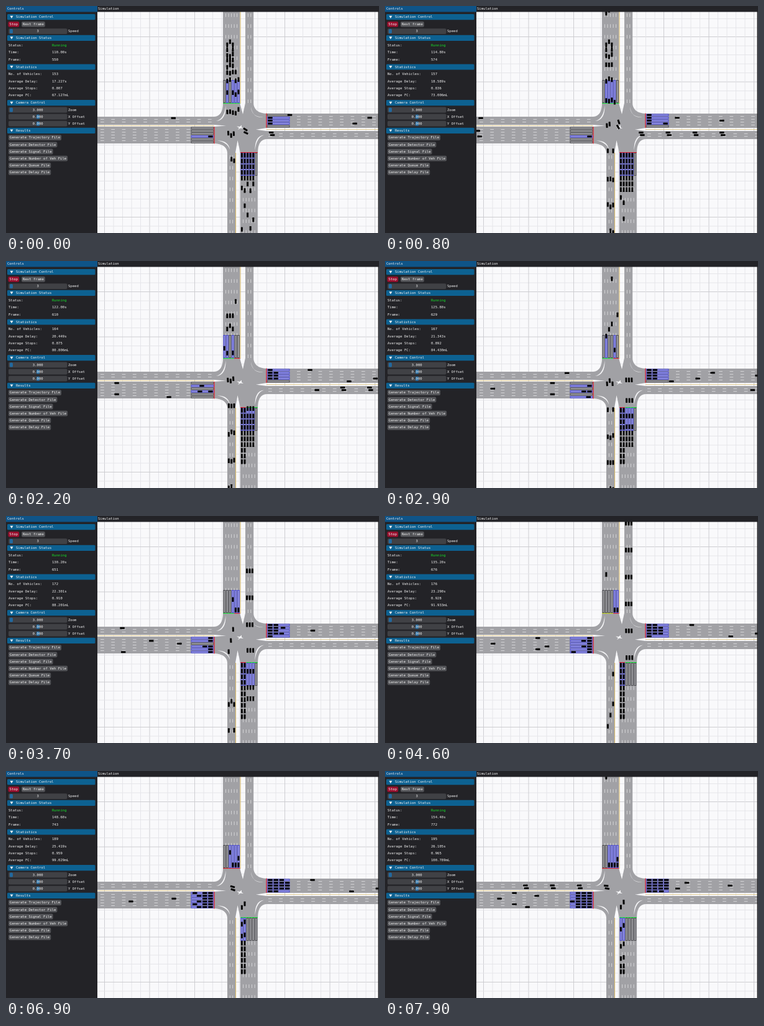
An HTML page with a canvas for the animation above (8 s loop, 600 px wide and 365 px high).

```html
<!DOCTYPE html>
<html lang="en">
<head>
<meta charset="utf-8">
<title>Traffic simulation</title>
<style>
html, body { margin: 0; width: 100%; height: 100%; overflow: hidden; background: #232327; }
canvas { display: block; }
</style>
</head>
<body>
<canvas id="stage" width="600" height="365"></canvas>
<script>
const ctx = document.getElementById('stage').getContext('2d');
const LOOP = 8000, STEP = 100, SPEED = 24, GAP = 9.2;
const FIRST = 550, LAST = 772;

// The simulation does not advance quite evenly: [ms, frame].
const pace = [[0, FIRST], [800, 574], [2200, 610], [4600, 676], [7900, LAST]];
function frameAt(ms) {
  const i = Math.max(1, pace.findIndex(([t]) => t >= ms));
  const [t0, f0] = pace[i - 1], [t1, f1] = pace[i];
  return Math.round(f0 + (f1 - f0) * (ms - t0) / (t1 - t0));
}
// A statistic that climbs from a to b, faster at first when bend > 0.
function climb(frame, a, b, bend) {
  const p = (frame - FIRST) / (LAST - FIRST);
  return a + (b - a) * (p + bend * p * (1 - p));
}

let seed = 7;
function random() {
  seed = seed * 16807 % 2147483647;
  return seed / 2147483647;
}

// Lane centres of the approaches and of the exits.
const lanes = (first, step, n) => Array.from({ length: n }, (_, i) => first + step * i);
const north = lanes(351.3, 4.53, 6), south = lanes(379.4, 4.6, 6);
const west = lanes(196.3, 4.5, 6), east = lanes(175.3, 4.53, 5);
const southOut = lanes(358.4, 4.3, 3), northOut = lanes(387.6, 4.4, 3);

// ---- vehicles ----
const cars = [];
function route(d) {
  const path = document.createElementNS('http://www.w3.org/2000/svg', 'path');
  path.setAttribute('d', d);
  return path;
}
// Distance covered after u seconds when accelerating from rest up to full speed.
function run(u, accel) {
  if (u <= 0) return 0;
  return u < SPEED / accel ? accel * u * u / 2 : SPEED * u - SPEED * SPEED / accel / 2;
}
function add(path, stop, arrive, depart = 1e4) {
  cars.push({ path, stop, arrive, depart, brake: 7, accel: 3.9 });
}
function cruise(path, pos, time) {
  cars.push({ path, stop: pos, arrive: time, depart: time, brake: 1e9, accel: 1e9 });
}
function place(car, T) {
  const s = car.stop - run(car.arrive - T, car.brake) + run(T - car.depart, car.accel);
  const p = car.path.getPointAtLength(s);
  const q = car.path.getPointAtLength(s + 1), r = car.path.getPointAtLength(s - 1);
  return { x: p.x, y: p.y, angle: Math.atan2(q.y - r.y, q.x - r.x) };
}

// From the north: right turn, three straight lanes, two left-turn lanes.
const northRight = route(`M${north[0]} -400V160Q${north[0]} 180.2 333 180.2H-900`);
cruise(northRight, 655, 110);
cruise(northRight, 742, 130.4);
const northAhead = southOut.map((x, i) =>
  route(`M${north[i + 1]} -400V157C${north[i + 1]} 190 ${x} 200 ${x} 236V1200`));
northAhead.forEach((path, i) => {
  for (let row = 0; row < 11; row++) {
    const place = 552 - row * GAP + random() * 6 - 3;
    if (random() < .87) add(path, place, 0, 102.9 + row * 1.42);
  }
  add(path, 488, 119.7 + i * .2, 121.7 + i * .75);
  add(path, 551, 162 - Math.sqrt(i) * 11);
});
cruise(northAhead[2], 539, 130.4);
cruise(northAhead[0], 494, 135.2);
// The inner of two turning lanes starts a little later, so pairs leave abreast.
const INNER = .37;
[[4, 207.4], [5, 203.4]].forEach(([lane, y], inner) => {
  const x = north[lane], path = route(`M${x} -400V172Q${x} ${y} 404 ${y}H1600`);
  for (let row = 0; row < 6 - inner; row++) {
    add(path, 552 - row * GAP, 0, 102.7 + row * 1.42 + inner * INNER);
  }
  add(path, 551, 127.3 + inner * 2.9);
  if (inner) add(path, 542, 149.3);
});

// From the south: two left-turn lanes, then three straight lanes.
south.slice(0, 5).forEach((x, lane) => {
  const left = lane < 2, y = 188.4 - lane * 4.3, out = northOut[lane - 2];
  const path = route(left
    ? `M${x} 800V212Q${x} ${y} 348 ${y}H-900`
    : `M${x} 800V236C${x} 200 ${out} 195 ${out} 157V-900`);
  const begin = left ? 142.9 + (1 - lane) * INNER : 120.8;
  for (let row = 0; row < (left ? 10 : 7); row++) {
    add(path, 560 - row * GAP, 97.5 + row * 2.5 + random() * 2, begin + row * 1.42);
  }
});

// West and east stay red: each lane has its first arrival, then a steady headway.
const westFirst = [130, 124, 134, 108, 130, 126.5], eastFirst = [113, 105, 108, 104, 129];
west.forEach((y, lane) => {
  const path = route(`M-300 ${y}H900`), headway = (170 - westFirst[lane]) / 4;
  for (let row = 0; row < 5; row++) add(path, 629 - row * GAP, westFirst[lane] + row * headway);
});
east.forEach((y, lane) => {
  const path = route(`M1000 ${y}H-200`);
  for (let row = 0; row < 5; row++) add(path, 575 - row * GAP, eastFirst[lane] + row * 13);
});

// ---- drawing helpers ----
function box(x, y, w, h, color, radius = 0) {
  ctx.fillStyle = color;
  ctx.beginPath();
  ctx.roundRect(x, y, w, h, radius);
  ctx.fill();
}
function line(x1, y1, x2, y2, color, width = 1) {
  ctx.strokeStyle = color;
  ctx.lineWidth = width;
  ctx.beginPath();
  ctx.moveTo(x1, y1);
  ctx.lineTo(x2, y2);
  ctx.stroke();
}
function text(str, x, y, color = '#f2f2f2', align = 'left') {
  ctx.save();
  ctx.translate(x, y);
  ctx.scale(.1, .1);
  ctx.font = '56px "DejaVu Sans Mono", monospace';
  ctx.textBaseline = 'middle';
  ctx.textAlign = align;
  ctx.fillStyle = color;
  ctx.fillText(str, 0, 2);
  ctx.restore();
}

// ---- map ----
const ROAD = '#a1a1a5', LINE = '#d8b860', PANEL = '#232327', BLUE = '#0d6191';
function drawGrid() {
  box(147, 9, 453, 356, '#f9f9fb');
  for (let i = -16; i <= 16; i++) {
    const color = i % 5 === 0 ? '#c9c9cd' : '#e4e4e8';
    const x = 376 + i * 14.5, y = 194.5 + i * 14.5;
    line(x, 9, x, 365, color, .9);
    line(147, y, 600, y, color, .9);
  }
}
// A straight carriageway; its lane dividers are dashed from d1 to d2.
function road(x, y, w, h, n, d1, d2) {
  box(x, y, w, h, ROAD);
  ctx.setLineDash([5.7, 11.6]);
  for (let i = 1; i < n; i++) {
    if (h > w) line(x + w * i / n, d1, x + w * i / n, d2, '#ececee', .7);
    else line(d1, y + h * i / n, d2, y + h * i / n, '#ececee', .7);
  }
  ctx.setLineDash([]);
}
const junction = new Path2D('M349 156Q349 177 335 178V191L354 192.5 335 194V221Q355 222 356 236H369L372.5 216 377 236H405Q405 215 419 214V201L402 198.7 419 196V173Q399 172 398 156H385L381 174 376 156Z');
// White slivers beside the right-turn curves, and the island in the middle.
const islands = new Path2D('M353.5 160Q354 184 338 185Q351 182 353.5 160ZM340 216.5Q358 216 360 231Q356 219 340 216.5ZM400.5 232Q400 209 415 207.5Q403 211 400.5 232ZM394 162Q395 179 414 178.5Q397 181 394 162ZM371 193.5L376 194 379 191.5 379 195 382 197 377 196.5 373 199 375 196Z');
function drawRoads() {
  road(349, 9, 27.2, 148, 6, 12, 119);
  road(385, 9, 13.2, 148, 3, 12, 157);
  road(356, 235, 13, 130, 3, 240, 365);
  road(377, 235, 27.8, 130, 6, 274, 365);
  road(147, 178, 188, 13, 3, 152, 335);
  road(147, 194, 188, 27, 6, 152, 297);
  road(419, 173, 181, 23, 5, 468, 600);
  road(419, 201, 181, 13, 3, 422, 600);
  ctx.fillStyle = ROAD;
  ctx.fill(junction);
  ctx.fillStyle = '#f4f4f6';
  ctx.fill(islands);
  line(377, 9, 377, 157, LINE);
  line(369.6, 236, 369.6, 365, LINE);
  line(147, 192.4, 335, 192.4, LINE, .7);
  line(419, 198.6, 600, 198.6, LINE, .7);
}
function detector(x, y, w, h, spots) {
  const busy = spots.some(p => p.x > x && p.x < x + w && p.y > y && p.y < y + h);
  if (busy) box(x, y, w, h, '#9292dc');
  ctx.strokeStyle = busy ? '#3c3cd6' : '#3c3c40';
  ctx.lineWidth = .8;
  ctx.strokeRect(x, y, w, h);
}
function drawSignals(T) {
  const red = '#e3202c', green = '#18e83c', amber = '#c8dc18';
  const ahead = T < 134.4 ? green : T < 137 ? amber : red;
  const left = T < 118 ? green : T < 120.6 ? amber : red;
  line(349, 156.6, 367, 156.6, ahead);
  line(367, 156.6, 376.5, 156.6, left);
  line(377, 235.5, 386.3, 235.5, T < 142.9 ? red : green);
  line(386.3, 235.5, 405, 235.5, T < 120.8 ? red : green);
  line(335, 194, 335, 221.5, red, 1.2);
  line(419, 172.5, 419, 196, red, 1.2);
}
function drawMap(T) {
  const spots = cars.map(car => place(car, T));
  drawGrid();
  drawRoads();
  north.forEach(x => detector(x - 1.4, 119.5, 2.8, 36, spots));
  south.forEach(x => detector(x - 1.4, 236.5, 2.8, 36, spots));
  west.forEach(y => detector(298, y - 1.4, 36, 2.8, spots));
  east.forEach(y => detector(420, y - 1.4, 36, 2.8, spots));
  drawSignals(T);
  for (const p of spots) {
    ctx.save();
    ctx.translate(p.x, p.y);
    ctx.rotate(p.angle);
    box(-3.7, -1.5, 7.4, 3, '#050505', .5);
    ctx.restore();
  }
  box(598.6, 9, 2, 356, PANEL);
}

// ---- control panel ----
function header(label, y) {
  box(2, y - 4.6, 141.5, 9.2, BLUE, 1.5);
  ctx.fillStyle = '#f2f2f2';
  ctx.beginPath();
  ctx.moveTo(6.5, y - 2);
  ctx.lineTo(11.5, y - 2);
  ctx.lineTo(9, y + 2.2);
  ctx.fill();
  text(label, 16, y);
}
function row(label, value, y, color) {
  text(label, 4, y);
  text(value, 74, y, color);
}
function button(label, x, y, color = '#525357') {
  box(x, y - 4.4, label.length * 3.37 + 4.2, 8.8, color, 2);
  text(label, x + 2.1, y);
}
function slider(label, value, y, grab) {
  box(4, y - 4.4, 94.5, 8.8, '#404145', 2);
  box(grab, y - 3.5, 5, 7, '#22699f', 1.5);
  text(value, 51.3, y, '#f2f2f2', 'center');
  text(label, 100, y);
}
function drawPanel(frame) {
  box(0, 0, 147, 365, PANEL);
  box(0, 0, 147, 9.5, '#0f5488');
  box(147, 0, 453, 9.5, PANEL);
  text('Controls', 2, 4.8);
  text('Simulation', 148, 4.8);

  header('Simulation Control', 17.7);
  button('Stop', 3.5, 29.3, '#980f2d');
  button('Next frame', 25, 29.3);
  slider('Speed', '3', 40.6, 6);

  header('Simulation Status', 51.3);
  row('Status:', 'Running', 63.5, '#16e02a');
  row('Time:', (frame / 5).toFixed(2) + 's', 74.8);
  row('Frame:', String(frame), 86);

  header('Statistics', 98);
  row('No. of Vehicles:', String(Math.floor(climb(frame, 153, 195, 0))), 109.8);
  row('Average Delay:', climb(frame, 17.227, 26.105, .47).toFixed(3) + 's', 121);
  row('Average Stops:', climb(frame, .807, .965, .8).toFixed(3), 132.3);
  row('Average FC:', climb(frame, 67.127, 100.789, .69).toFixed(3) + 'mL', 143.5);

  header('Camera Control', 155.7);
  slider('Zoom', '3.000', 167, 6);
  slider('X Offset', '0.000', 178, 49);
  slider('Y Offset', '0.000', 189.2, 49);

  header('Results', 200.4);
  ['Trajectory', 'Detector', 'Signal', 'Number of Veh', 'Queue', 'Delay'].forEach((name, i) =>
    button(`Generate ${name} File`, 4, 211.7 + i * 11.15));
}

let shown = -1;
const start = performance.now();
function tick() {
  const ms = Math.floor(((performance.now() - start) % LOOP) / STEP) * STEP;
  if (ms !== shown) {
    shown = ms;
    const frame = frameAt(ms);
    drawMap(frame / 5);
    drawPanel(frame);
  }
  requestAnimationFrame(tick);
}
tick();
</script>
</body>
</html>
```
